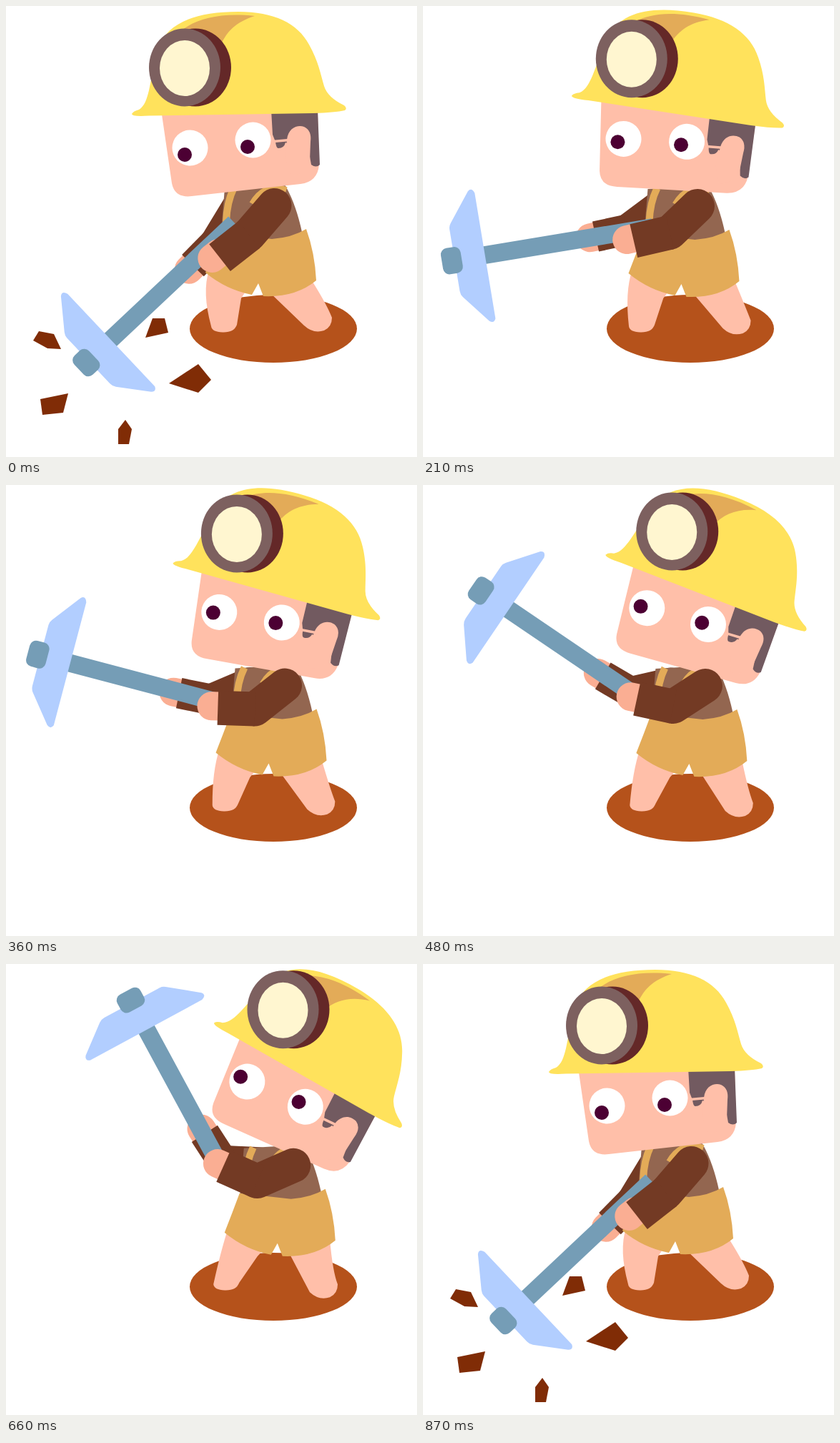
An HTML page for the animation above (0.9 s loop, 575 px wide and 631 px high).

```html
<!DOCTYPE html>
<html lang="en">
<head>
<meta charset="utf-8">
<title>Miner</title>
<style>
html, body { margin: 0; width: 100%; height: 100%; overflow: hidden; background: #fff; }
svg { display: block; width: 100vw; height: 100vh; }
.skin { fill: #ffbfa9; }
.cloth { fill: #e3ab58; }
.strap { fill: none; stroke: #e3ab58; stroke-width: 10; }
.steel { fill: #759db6; }
.sleeve { stroke: #733a24; }
.hand { stroke: #faae93; stroke-width: 40; stroke-linecap: round; }
.round { stroke-linecap: round; }
</style>
</head>
<body>
<svg viewBox="0 0 575 631">
  <ellipse cx="374" cy="451.5" rx="117" ry="47.5" fill="#b5521b"/>

  <g id="farArm" stroke-width="43">
    <path class="hand"/>
    <path class="sleeve round"/>
    <path class="sleeve"/>
  </g>

  <path id="legL" class="skin"/>
  <path id="legR" class="skin"/>

  <g id="body">
    <path fill="#936650" d="M306 255L390 250Q405 275 414 316Q395 328 372 328H300Z"/>
    <path class="strap" d="M319 254Q309 274 308 302"/>
    <path class="strap" d="M392 258Q362 248 345 277"/>
    <path class="cloth" d="M420 312Q432 345 434 384Q405 408 360 406L353 388L344 404Q308 397 279 373Q290 345 300 318L372 326Q400 324 420 312Z"/>
  </g>

  <g id="head">
    <path class="skin" d="M217 145L232 248Q236 269 260 266L412 249Q436 246 438 222L436 145Z"/>
    <path fill="#725a60" d="M371 145H436L439 222Q434 227 427 222L424 205L391 191Q389 199 381 199Q378 199 377 190L373 180Z"/>
    <path class="skin" d="M391 215L393 187C395 170 408 166 417 169Q428 174 426 190L425 217Q418 236 400 238Z"/>
    <path d="M374 189.500L396 187.500" stroke="#ffbfa9" stroke-width="3.500"/>
    <circle cx="257.500" cy="198.500" r="25" fill="#fff"/>
    <circle cx="345.500" cy="187.500" r="25" fill="#fff"/>
    <path fill="#ffe25c" d="M176 151Q178 147 186 145C194 140 197 130 200 118L212 60C225 25 262 8 325 8C375 8 408 24 424 54C437 77 440 95 445 112Q450 128 473 139Q478 143 474 146Q460 149 430 150L200 153.500Q176 155 176 151Z"/>
    <path class="cloth" d="M246 34C266 18 300 9 348 14C322 22 308 36 300 56L285 62Z"/>
  </g>

  <circle class="pupil" r="10" fill="#4c0033"/>
  <circle class="pupil" r="10" fill="#4c0033"/>

  <g id="lamp">
    <ellipse cx="15" cy="-1" rx="50" ry="54.500" fill="#642828"/>
    <ellipse cy="-1" rx="50" ry="54.500" fill="#7d605f"/>
    <ellipse rx="35" ry="39" fill="#fff6d0"/>
  </g>

  <g id="pick">
    <path class="steel" d="M-1 -12.500H260V12.500H-1Z"/>
    <path fill="#b2ceff" d="M237 88V-90Q240 -97 246 -92L277 -53Q280 -49 280 -44V44Q280 48 277 52L246 92Q240 97 237 88Z"/>
    <rect class="steel" x="270" y="-18.500" width="28" height="37" rx="9"/>
  </g>

  <g id="nearArm" stroke-width="48">
    <path class="hand"/>
    <path class="sleeve round"/>
    <path class="sleeve"/>
  </g>

  <g id="rocks" fill="#802c06">
    <path d="M38 468L46 455L67 459L77 480L58 479Z"/>
    <path d="M205 437H222L227 457L195 464Z"/>
    <path d="M228 528L269 501L287 523L269 541Z"/>
    <path d="M48 550L87 542L80 569L51 572Z"/>
    <path d="M157 592L167 579L176 592L172 613H157Z"/>
  </g>
</svg>
<script>
const $ = id => document.getElementById(id);
const LOOP = 900, STEP = 30, RAD = Math.PI / 180;
const HEAD = [345, 239], HEAD_SHIFT = [40.6, 4.2];

// [time, amount]: slow wind-up, quick extra lift, then the blow
const BODY = [[0, 0], [570, 1], [630, 1.36], [750, 0.575], [870, 0]];
const PICK = [[0, 0], [570, 1], [630, 1.3], [750, 0.66], [870, 0]];
const DRIFT = [[-32, -12], [26, -16.5], [25, 0], [-27, 1], [0, 12]];

const pupils = document.querySelectorAll('.pupil');
const rocks = [...$('rocks').children];

function sample(keys, t) {
  const i = keys.findIndex(k => k[0] >= t);
  if (i < 1) return keys[0][1];
  const [t0, v0] = keys[i - 1], [t1, v1] = keys[i];
  return v0 + (v1 - v0) * (t - t0) / (t1 - t0);
}

// Point reached from `from` by the offset (u, v) turned by deg
function offset(from, deg, u, v = 0) {
  const c = Math.cos(deg * RAD), s = Math.sin(deg * RAD);
  return [from[0] + u * c - v * s, from[1] + u * s + v * c];
}

const move = (el, x, y) => el.setAttribute('transform', `translate(${x} ${y})`);
const draw = (el, d) => el.setAttribute('d', d);

function arm(el, shoulder, elbow, deg, length, reach, lift) {
  const [hand, upper, fore] = el.children;
  draw(hand, `M${offset(elbow, deg, length - 2, lift)}L${offset(elbow, deg, length + reach, lift)}`);
  draw(upper, `M${shoulder}L${elbow}`);
  draw(fore, `M${elbow}L${offset(elbow, deg, length)}`);
}

function pose(t) {
  const b = sample(BODY, t), q = sample(PICK, t);
  const tilt = 26.2 * b, x = 23 * b, y = 2.4 * b;

  move($('body'), x, y);

  const shift = HEAD_SHIFT.map(d => d * b);
  const centre = HEAD.map((p, i) => p + shift[i]);
  const onHead = (px, py) => offset(centre, tilt, px - HEAD[0], py - HEAD[1]);
  $('head').setAttribute('transform', `translate(${shift}) rotate(${tilt} ${HEAD})`);
  move($('lamp'), ...onHead(250, 87));
  [[257.5, 198.5], [345.5, 187.5]].forEach((eye, i) => {
    const [ex, ey] = onHead(...eye);
    move(pupils[i], ex - 7.5 - 1.5 * b, ey + 9.5 - 14 * b);
  });

  const f = 0.12 * x, g = 0.3 * x, h = 0.46 * x;
  draw($('legL'), `M${284 + x} 370Q${274 + x} 400 ${287 + f} 448Q${288 + f} 456 ${303 + f} 456.5Q${319 + f} 457 ${323 + f} 446L${329 + 0.85 * x} 409L${338 + x} 395Z`);
  draw($('legR'), `M${366 + x} 398L${417 + g} ${447 + h}Q${430 + g} ${459 + h} ${445 + g} ${454 + h}Q${456 + g} ${449 + h} ${456 + g} ${436 + h}Q${449 + g} ${418 + h} ${429 + 0.9 * x} 386V370Z`);

  const grip = [319 + 10 * q - 16 * q * q, 304.2 + 24 * q * (1 - q)];
  $('pick').setAttribute('transform', `translate(${grip}) rotate(${136.7 + 92 * q})`);

  arm($('farArm'), [327 + x, 275 + y],
    [293 - 34 * q + 37 * q * q, 331 - 49 * q],
    134.5 + 90 * q, 45, 8, 0);
  arm($('nearArm'), [375.5 + x, 279 + y],
    [340 + 17 * q - 6 * q * q, 320 - 6 * q - 7 * q * q],
    141.9 + 74 * q - 17 * q * q, 52, 9, 6 * (1 - Math.min(q, 1)));

  const age = t === 870 ? 0 : t;
  $('rocks').style.display = age <= 120 ? '' : 'none';
  rocks.forEach((rock, i) => move(rock, DRIFT[i][0] * age / 120, DRIFT[i][1] * age / 120));
}

const start = performance.now();
function tick() {
  const t = (performance.now() - start + 4) % LOOP;
  pose(Math.floor(t / STEP) * STEP);
  requestAnimationFrame(tick);
}
tick();
</script>
</body>
</html>
```
